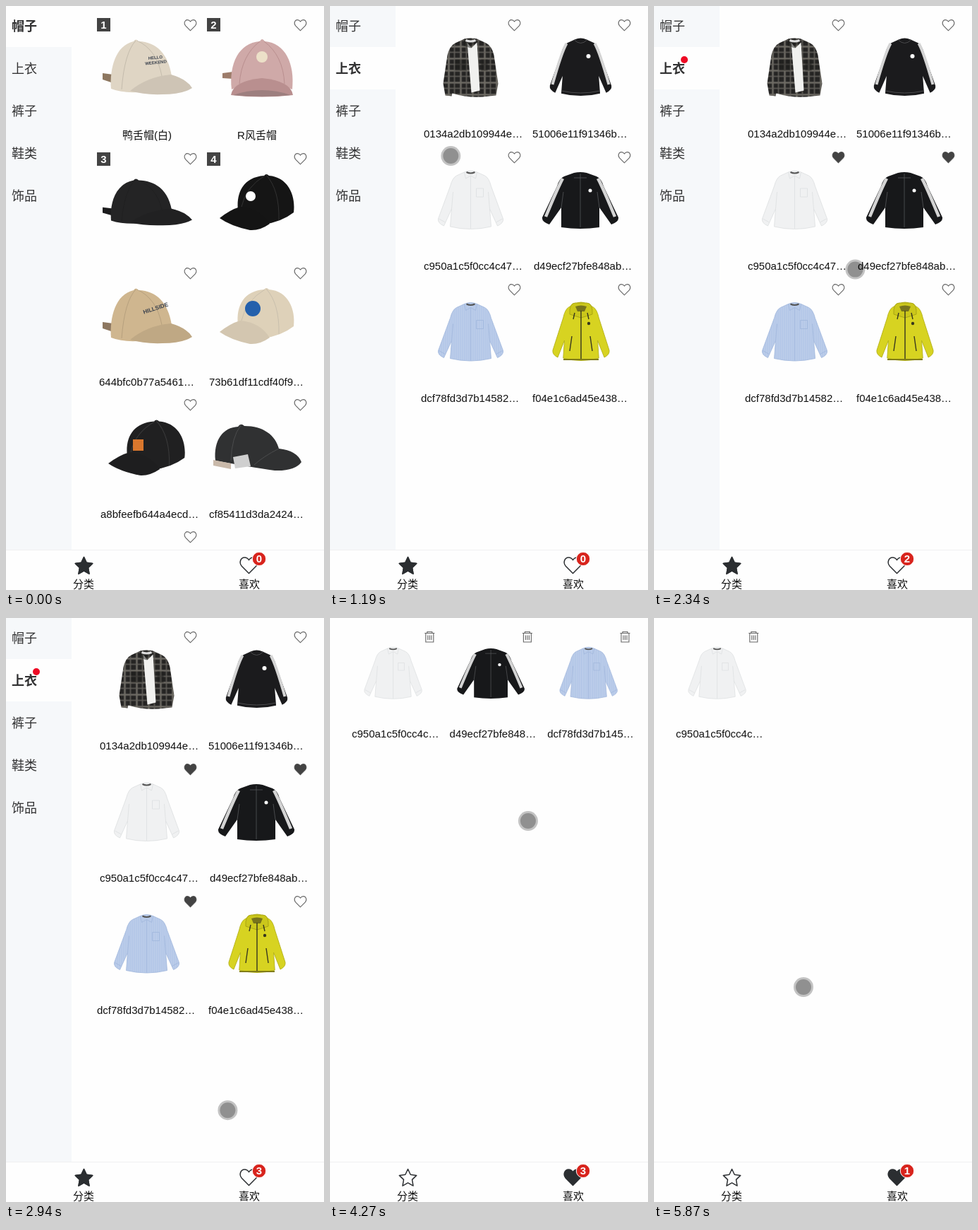
An HTML page that plays this animation: 451 px wide and 826 px high, repeating every 5890 ms.

```html
<!DOCTYPE html>
<html lang="zh">
<head>
<meta charset="utf-8">
<title>衣橱</title>
<style>
  html, body { margin: 0; width: 100%; height: 100%; overflow: hidden; background: #fefefe; }
  svg { display: block; width: 451px; height: 826px; }
  text { font: 15px "Liberation Sans", "Noto Sans CJK SC", sans-serif; fill: #111; }
  .side text { font-size: 18px; fill: #323233; }
  .side .bold { font-weight: bold; }
  .mid { text-anchor: middle; }
  .num { font-weight: bold; fill: #fff; text-anchor: middle; }
  .print text { font-size: 6px; font-weight: bold; fill: #3a414d; text-anchor: middle; }
  .line { fill: none; stroke: #666; stroke-width: 1.1; }
  .icon { fill: none; stroke: #2b2e31; stroke-width: 1.5; stroke-linejoin: round; }
  .solid { fill: #2b2e31; }
</style>
</head>
<body>
<svg viewBox="0 0 451 826">
  <defs>
    <path id="heart" d="M0 7.8L-6.9 .8C-10-2.8-7.6-7.4-4.2-7.4C-2.2-7.4-.8-6.2 0-5C.8-6.2 2.2-7.4 4.2-7.4C7.6-7.4 10-2.8 6.9 .8Z"/>
    <path id="star" d="M0-12L3.7-4.2L12.2-3.1L6 2.9L7.5 11.6L0 7.4L-7.5 11.6L-6 2.9L-12.2-3.1L-3.7-4.2Z"/>
    <g id="trash" class="line">
      <path d="M-7-5.5H7M-3.5-5.5V-7.5H3.5V-5.5M-5.5-5.5V7H5.5V-5.5M-2.5-2.5V4M0-2.5V4M2.5-2.5V4"/>
    </g>

    <!-- caps: main tone from fill, strap from color, shading in translucent black -->
    <g id="capSide">
      <path d="M152 97L137 95V104L152 109Z" fill="currentColor"/>
      <path d="M149 117C147 88 155 56 181 50Q184 45 188 50C214 51 230 68 235 99L186 122Q164 123 149 117Z"/>
      <path id="bill" d="M176 120Q200 100 234 97Q256 103 264 116Q250 125 222 125Q196 126 176 120Z"/>
      <use href="#bill" fill="#000" fill-opacity=".08"/>
      <path d="M184 49Q168 66 164 118M186 49Q214 62 221 99" fill="none" stroke="#000" stroke-opacity=".12"/>
    </g>
    <g id="capTurn">
      <path d="M329 290C326 262 338 242 366 240Q369 236 373 240C400 242 411 268 408 292Q390 306 364 309Z"/>
      <path id="visor" d="M303 300Q318 288 332 284Q360 286 374 308Q360 318 346 317Q318 311 303 300Z"/>
      <use href="#visor" fill="#000" fill-opacity=".05"/>
      <path d="M369 239Q388 260 387 303M367 240Q340 256 334 284" fill="none" stroke="#888" stroke-opacity=".25"/>
    </g>

    <path id="shirtCut" d="M-9-40L-20-35Q-26-32-29-20L-46 26Q-47 32-38 36L-27 12L-29 37Q0 44 29 37L27 12L38 36Q47 32 46 26L29-20Q26-32 20-35L9-40Q0-44-9-40Z"/>
    <path id="jacketCut" d="M-9-39L-23-34Q-30-31-33-20L-54 24Q-55 30-44 34L-27 10V38Q0 42 27 38V10L44 34Q55 30 54 24L33-20Q30-31 23-34L9-39Q0-41-9-39Z"/>
    <path id="flannelCut" d="M-9-41L-22-35Q-30-31-33-18L-39 22L-36 39L-27 40L-26 36Q0 44 26 40L36 39L39 22L33-18Q30-31 22-35L9-41Q0-43-9-41Z"/>
    <g id="shirtTrim" fill="none">
      <path d="M-9-40L-7-31L0-35L7-31L9-40M0-35V40M8-17H18V-5H8ZM-27 12L-25-12M27 12L25-12M-45 26L-36 31M45 26L36 31"/>
      <path d="M-6-40Q0-37 6-40" stroke="#555" stroke-width="2"/>
    </g>
    <pattern id="stripe" width="3" height="3" patternUnits="userSpaceOnUse">
      <path d="M0 0H3V3H0Z" fill="#bccdea"/><path d="M.5 0V3" stroke="#aec3e5"/>
    </pattern>
    <pattern id="plaid" width="17" height="17" patternUnits="userSpaceOnUse">
      <path d="M0 0H17V17H0Z" fill="#252423"/>
      <path d="M3 0V17M0 4H17" stroke="#8d8981" stroke-width="2.5" stroke-opacity=".7"/>
      <path d="M11 0V17M0 12H17" stroke="#625f5a" stroke-width="1.5"/>
    </pattern>

    <g id="white" stroke="#dcdfe0" stroke-width=".8"><use href="#shirtCut" fill="#f0f1f2"/><use href="#shirtTrim"/></g>
    <g id="blue" stroke="#a0b6dc" stroke-width=".8"><use href="#shirtCut" fill="url(#stripe)"/><use href="#shirtTrim"/></g>
    <g id="track">
      <use href="#jacketCut" fill="#17181a"/>
      <path d="M-25-31Q-32-18-49 23M25-31Q32-18 49 23" fill="none" stroke="#d4d4d4" stroke-width="4.5"/>
      <path d="M0-38V38M-9-32H9M-27 10L-24-12M27 10L24-12" fill="none" stroke="#55575a" stroke-width=".8"/>
      <circle cx="14" cy="-14" r="2.5" fill="#fff"/>
    </g>
    <g id="sweater">
      <use href="#shirtCut" fill="#1b1b1d" transform="scale(.95 .99)"/>
      <path d="M-20-34Q-27-22-40 24M20-34Q27-22 40 24" fill="none" stroke="#d4d4d4" stroke-width="4"/>
      <path d="M-9-39Q0-30 9-39M-27 33Q0 39 27 33" fill="none" stroke="#4a4a4c"/>
      <circle cx="11" cy="-16" r="3" fill="#fff"/>
    </g>
    <g id="flannel">
      <use href="#flannelCut" fill="url(#plaid)"/>
      <path d="M-5-36L1-28L9-36L13 32L1 35Z" fill="#f1f1ef"/>
      <path d="M-9-41L-10-31L0-28L9-41ZM-22-12H-6V4H-22ZM15-12H24V4H15Z" fill="#1d1c1b" fill-opacity=".5"/>
      <path d="M-7-39Q0-36 7-39" stroke="#ddd" stroke-width="3" fill="none"/>
    </g>
    <g id="shell">
      <use href="#shirtCut" fill="#d7d321" stroke="#b5b11a" transform="scale(.87 1)"/>
      <path d="M-16-25Q-17-41-8-41H8Q17-41 16-25L0-20Z" fill="#cbc71b" stroke="#a9a514"/>
      <path d="M-8-36Q0-39 8-36L5-29H-5Z" fill="#77731c"/>
      <path d="M0-30V39M-13 6L-16 27M13 6L16 27M-9-27L-11-18M9-27L11-18" stroke="#37371f" stroke-width="1.4" fill="none"/>
      <path d="M-25 39H25" stroke="#817d18" stroke-width="2"/>
      <circle cx="11" cy="-12" r="2.2" fill="#37371f"/>
    </g>
  </defs>

  <rect width="451" height="826" fill="#fefefe"/>
  <g class="side" id="side" data-on="0 3650"></g>

  <g id="hats" data-on="0 740">
    <use href="#capSide" fill="#dfd5c4" color="#8d7760"/>
    <g class="print" transform="translate(212 75) rotate(-6)">
      <text>HELLO</text>
      <text y="7">WEEKEND</text>
    </g>
    <g fill="#cfa9a8">
      <path d="M322 93L307 95V102L322 103Z" fill="#9d7c6a"/>
      <path d="M320 118C316 82 330 52 360 50Q363 44 367 50C396 52 410 82 406 118Q363 98 320 118Z"/>
      <path d="M319 126Q322 106 363 102Q404 106 407 126Q363 131 319 126Z" fill="#b98f8f"/>
      <path d="M322 126Q363 112 404 126Q363 130 322 126Z" fill="#9d7f7f"/>
      <path d="M360 50Q334 70 331 110M366 50Q393 70 395 110" fill="none" stroke="#b98f8f"/>
    </g>
    <circle cx="363" cy="72" r="8" fill="#ece0c8"/>
    <use href="#capSide" fill="#242425" color="#1c1c1d" transform="translate(0 204) scale(1 .85)"/>
    <use href="#capTurn" fill="#151515"/>
    <circle cx="347" cy="269" r="7" fill="#fff"/>
    <use href="#capSide" fill="#cfb68f" color="#8d7760" transform="translate(0 352)"/>
    <g class="print" transform="translate(213 430) rotate(-18) scale(1.35)"><text>HILLSIDE</text></g>
    <use href="#capTurn" fill="#ded1b9" transform="translate(0 161)"/>
    <circle cx="350" cy="428" r="11" fill="#2460ac"/>
    <use href="#capTurn" fill="#202021" transform="translate(-167 350) scale(1.03 .99)"/>
    <rect x="180" y="613" width="15" height="16" fill="#d9772d"/>
    <path d="M297 643C294 614 308 596 329 595Q333 589 338 594C365 594 382 607 387 626Q413 629 419 645Q410 658 381 657Q346 652 297 643Z" fill="#303132"/>
    <path d="M387 626Q365 637 352 649M333 593Q320 610 319 643" fill="none" stroke="#4b4c4d"/>
    <path d="M294 642L319 647V655L294 650Z" fill="#c9b9aa"/>
    <path d="M322 638L343 634L347 651L325 654Z" fill="#cfcfcf"/>
  </g>

  <g id="tops" data-on="740 3650">
    <use href="#flannel" x="199.5" y="87.5"/>
    <use href="#sweater" x="355.5" y="87"/>
    <use href="#white" x="199.5" y="275"/>
    <use href="#track" x="355" y="275"/>
    <use href="#blue" x="199.5" y="461.5"/>
    <use href="#shell" x="356" y="461"/>
  </g>

  <g id="liked"></g>

  <rect y="769" width="451" height="57" fill="#fefefe"/>
  <path d="M0 769.5H451" stroke="#f0f0f1"/>
  <g transform="translate(110.5 791.5)">
    <use href="#star" class="icon"/>
    <use href="#star" class="icon solid" data-on="0 3530"/>
  </g>
  <g transform="translate(344.5 791) scale(1.48)">
    <use href="#heart" class="icon" style="stroke-width:1"/>
    <use href="#heart" class="solid" data-on="3530 5890"/>
  </g>
  <text class="mid" x="110" y="822.5">分类</text>
  <text class="mid" x="345" y="822.5">喜欢</text>
  <circle cx="359" cy="782" r="9.7" fill="#d8241d" stroke="#fff"/>
  <g id="count"></g>

  <g id="cursor">
    <circle id="click" cx="-7" cy="-7" r="26" fill="#ff0" fill-opacity=".5"/>
    <circle r="14" fill-opacity=".23"/>
    <circle r="11" fill-opacity=".26"/>
  </g>
</svg>
<script>
const LOOP = 5890;
const $ = id => document.getElementById(id);
const add = (id, html) => $(id).insertAdjacentHTML('beforeend', html);
const label = (x, y, s, cls = '') => `<text x="${x}" y="${y}" class="${cls}">${s}</text>`;
const during = (from, to, html) => `<g data-on="${from} ${to}">${html}</g>`;
const heart = (x, y, cls = 'line') => `<use href="#heart" x="${x}" y="${y}" class="${cls}"/>`;

// sidebar
add('side', `<rect width="93" height="769" fill="#f6f8fa"/>` +
  during(0, 740, '<rect width="93" height="58" fill="#fefefe"/>') +
  during(740, LOOP, '<rect y="58" width="93" height="60" fill="#fefefe"/>'));
['帽子', '上衣', '裤子', '鞋类', '饰品'].forEach((name, i) => {
  const y = 34.5 + 60 * i, plain = label(8, y, name), bold = label(8, y, name, 'bold');
  add('side', i > 1 ? plain :
    during(0, 740, i ? plain : bold) + during(740, LOOP, i ? bold : plain));
});
add('side', during(1560, LOOP, '<circle cx="43" cy="76" r="5" fill="#ee0a24"/>'));

// hats
for (const y of [27, 216, 378, 564]) add('hats', heart(261.5, y) + heart(417.5, y));
add('hats', heart(261.5, 751));
[[129, 17], [285, 17], [129, 207], [285, 207]].forEach(([x, y], i) =>
  add('hats', `<rect x="${x}" y="${y}" width="19" height="19" fill="#434343"/>` +
    label(x + 9.5, y + 15, i + 1, 'num')));
add('hats', label(200, 187.5, '鸭舌帽(白)', 'mid') + label(356, 187.5, 'R风舌帽', 'mid') +
  label(132, 537, '644bfc0b77a5461…') + label(288, 537, '73b61df11cdf40f9…') +
  label(134, 724, 'a8bfeefb644a4ecd…') + label(288, 724, 'cf85411d3da2424…'));

// tops: name, left edge, time of the like
[['0134a2db109944e…', 133], ['51006e11f91346b…', 287],
 ['c950a1c5f0cc4c47…', 133, 1560], ['d49ecf27bfe848ab…', 289, 2100],
 ['dcf78fd3d7b14582…', 129, 2460], ['f04e1c6ad45e438…', 287]].forEach(([name, x, liked], i) => {
  const row = i >> 1, hx = i % 2 ? 417.5 : 261.5, hy = 27 + 187 * row;
  add('tops', label(x, 186 + 187 * row, name) + heart(hx, hy) +
    (liked ? during(liked, LOOP, `<g fill="#434343">${heart(hx, hy, '')}</g>`) : ''));
});

// favourites: garment, name, slot, visible from, to
[['white', 'c950a1c5f0cc4c…', 0, 3650, LOOP],
 ['track', 'd49ecf27bfe848…', 1, 3650, 4960],
 ['blue', 'dcf78fd3d7b145…', 2, 3650, 4960],
 ['blue', 'dcf78fd3d7b145…', 1, 4960, 5640]].forEach(([kind, name, slot, from, to]) => {
  const x = 138.6 * slot;
  add('liked', during(from, to,
    `<use href="#${kind}" transform="translate(${89.5 + x} 78.5) scale(.885)"/>` +
    `<use href="#trash" x="${141.3 + x}" y="27"/>` + label(31 + x, 169, name)));
});

// likes in the badge
[[0, 0, 1560], [1, 1560, 2100], [2, 2100, 2460], [3, 2460, 4960], [2, 4960, 5640], [1, 5640, LOOP]]
  .forEach(([n, from, to]) => add('count', during(from, to, label(359, 787, n, 'num'))));

// pointer path: time, x, y
const path = [
  [20, 304, 605], [250, 190, 325], [470, 40, 80], [550, 41, 91], [760, 41, 91],
  [980, 100, 160], [1190, 171, 212], [1480, 256, 222], [1580, 258, 223], [1850, 340, 224],
  [2050, 409, 224], [2130, 408, 226], [2340, 286, 372], [2410, 240, 409], [2460, 240, 409],
  [2640, 201, 500], [2850, 270, 640], [3030, 342, 739], [3240, 343, 789], [3460, 343, 794],
  [3680, 343, 794], [4030, 318, 646], [4270, 281, 288], [4620, 271, 56], [4710, 271, 45],
  [4980, 271, 45], [5420, 271, 40], [5650, 271, 40], [5870, 212, 522], [LOOP, 212, 522]
];
const clicks = [670, 3460, 4890, 5570];

const slope = (i, k) => (path[i + 1][k] - path[i][k]) / (path[i + 1][0] - path[i][0]);
function tangent(i, k) {
  if (i < 1 || i > path.length - 2) return 0;
  const a = slope(i - 1, k), b = slope(i, k);
  return a * b > 0 ? 2 * a * b / (a + b) : 0;
}
function pointer(t, k) {
  let i = 0;
  while (i < path.length - 2 && t >= path[i + 1][0]) i++;
  const [p, q] = [path[i], path[i + 1]], h = q[0] - p[0], u = (t - p[0]) / h, v = 1 - u;
  return v * v * (1 + 2 * u) * p[k] + u * u * (1 + 2 * v) * q[k] +
    h * u * v * (v * tangent(i, k) - u * tangent(i + 1, k));
}

const timed = [...document.querySelectorAll('[data-on]')].map(el => [el, ...el.dataset.on.split(' ').map(Number)]);
const show = (el, on) => { el.style.display = on ? '' : 'none'; };
const start = performance.now();

function draw() {
  const t = (performance.now() - start) % LOOP;
  for (const [el, from, to] of timed) show(el, t >= from && t < to);
  show($('cursor'), t >= 20);
  show($('click'), clicks.some(c => t >= c && t < c + 70));
  if (t >= 20) $('cursor').setAttribute('transform', `translate(${pointer(t, 1)} ${pointer(t, 2)})`);
  requestAnimationFrame(draw);
}
draw();
</script>
</body>
</html>
```
